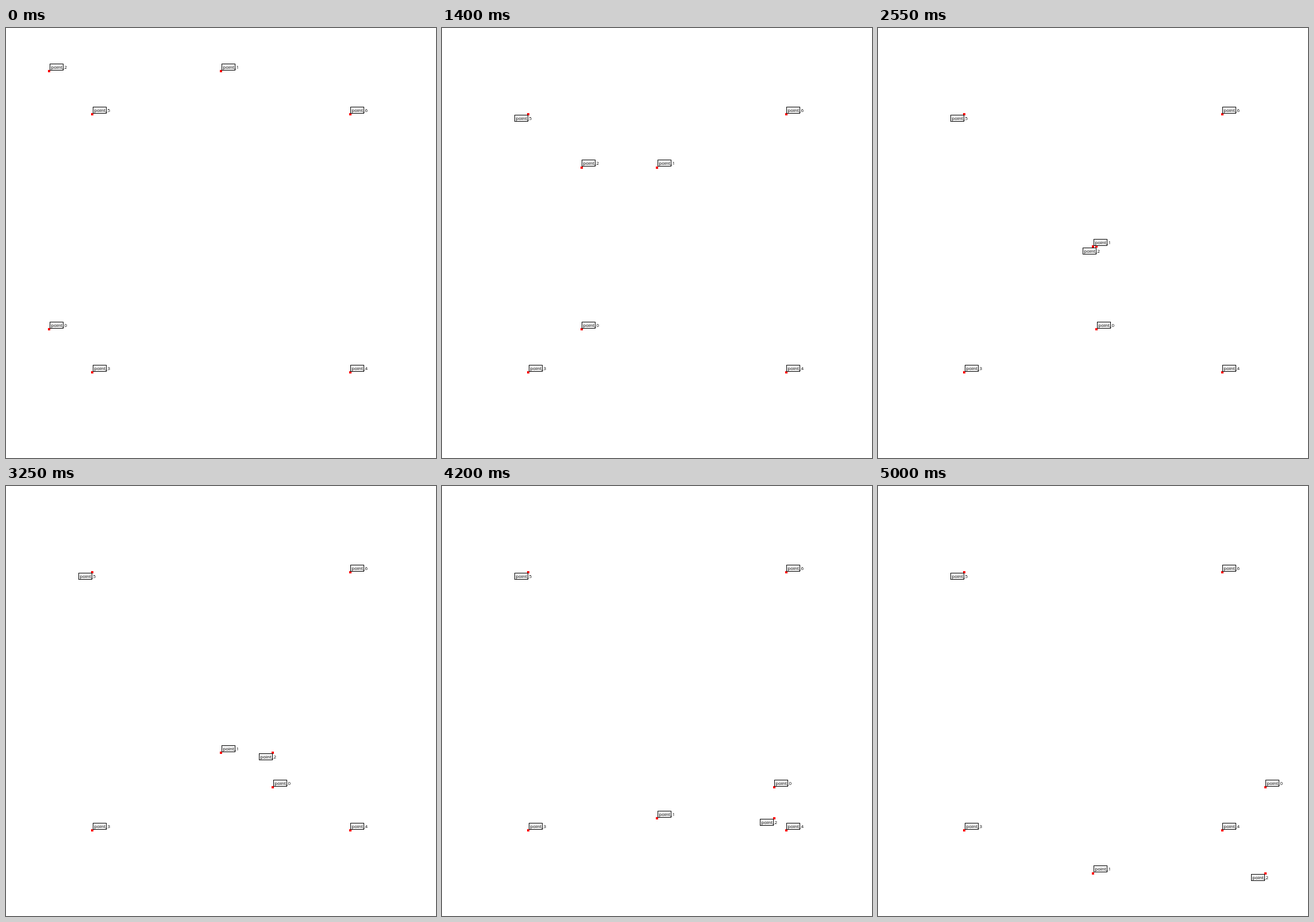
Write an HTML page with a canvas that moves like this. It is 748 by 748 pixels and loops after 5050 ms.

```html
<!DOCTYPE html>
<html>
<head>
<meta charset="utf-8">
<title>Moving points</title>
<style>
  html, body { margin: 0; width: 100%; height: 100%; overflow: hidden; background: #fff; }
  canvas { display: block; }
</style>
</head>
<body>
<canvas id="stage" width="748" height="748"></canvas>
<script>
const ctx = document.getElementById('stage').getContext('2d');
const SIZE = 748, STEP = 50, STEPS = 101;
const BOX_W = 24, BOX_H = 12;

// Points in units of a tenth of the stage; m runs from 1 to 9.
const pointsAt = m => [
  [m, 7], [5, m], [m, m], [2, 8], [8, 8], [2, 2], [8, 2]
].map(p => p.map(v => v * SIZE / 10));

// Top-left corner of a label for each placement.
const place = {
  upperRight: (x, y) => [Math.round(x) + 1, Math.round(y - 12.87)],
  above: (x, y) => [Math.round(x - 15), Math.round(y - 25)],
  lowerLeft: (x, y) => [Math.round(x) - 24, Math.round(y + 1.6)]
};

// Labels step aside when another one comes too close, and stay there.
function placement(i, k) {
  if (i === 5 && k >= 11) return place.lowerLeft;
  if (i === 2 && k >= 48) return place.lowerLeft;
  if (i === 2 && k >= 45) return place.above;
  return place.upperRight;
}

function drawDot([x, y]) {
  ctx.fillStyle = '#f00';
  ctx.fillRect(Math.ceil(x - 2 - 1e-6), Math.ceil(y - 2 - 1e-6), 4, 4);
}

function drawLabel([x, y], i, k) {
  const [left, top] = placement(i, k)(x, y);
  ctx.fillStyle = '#f2f2f2';
  ctx.fillRect(left, top, BOX_W, BOX_H);
  ctx.strokeStyle = '#000';
  ctx.strokeRect(left + 0.5, top + 0.5, BOX_W - 1, BOX_H - 1);
  ctx.fillStyle = '#000';
  ctx.fillText('point_' + i, left + 2.3, top + 9);
}

function draw(now) {
  const k = Math.floor(now / STEP) % STEPS;
  const points = pointsAt(1 + 8 * k / (STEPS - 1));
  ctx.fillStyle = '#fff';
  ctx.fillRect(0, 0, SIZE, SIZE);
  ctx.lineWidth = 1;
  ctx.font = '8px "Open Sans", "Noto Sans", sans-serif';
  points.forEach(drawDot);
  points.forEach((p, i) => drawLabel(p, i, k));
}

const start = performance.now();
function tick() {
  draw(performance.now() - start);
  requestAnimationFrame(tick);
}
tick();
</script>
</body>
</html>
```
